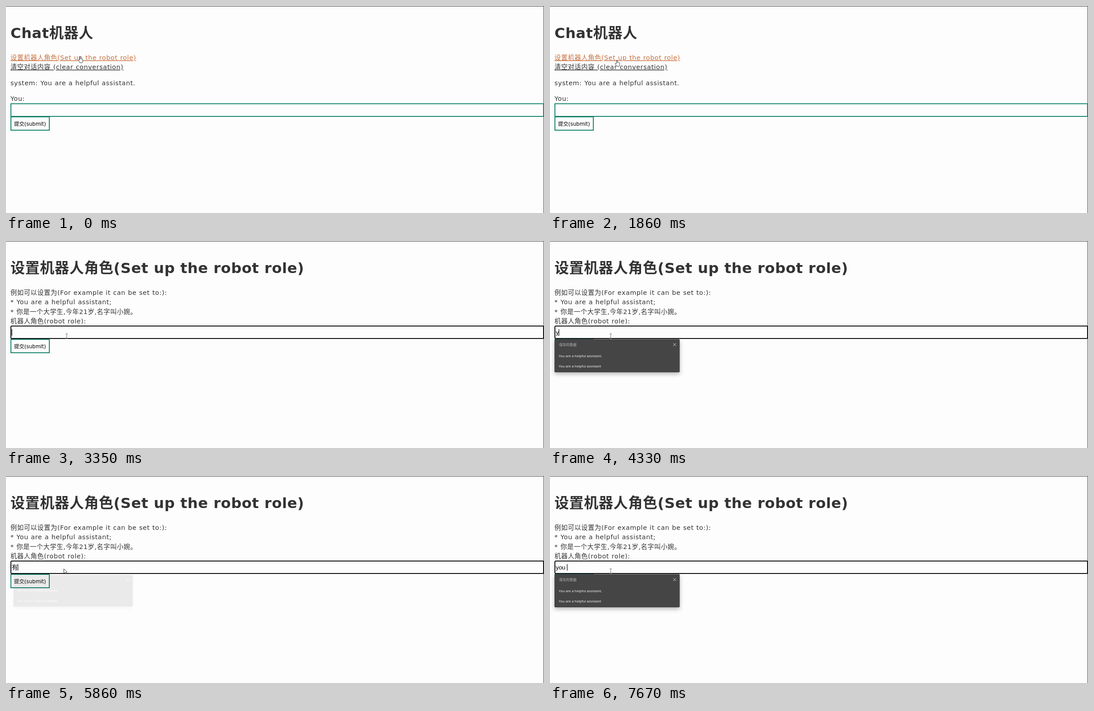
An HTML page that plays this animation: 1205x465 px, repeating every 8 s.

```html
<!DOCTYPE html>
<html lang="zh-CN">
<head>
<meta charset="utf-8">
<title>Chat</title>
<style>
html, body { margin: 0; width: 100%; height: 100%; overflow: hidden; background: #fdfdfd; }
svg { display: block; width: 1205px; height: 465px; }
text { font: 14.4px "DejaVu Sans", "Noto Sans CJK SC", "Noto Sans CJK", sans-serif; fill: #333; letter-spacing: .62px; word-spacing: .5px; }
.title { font-size: 32.4px; font-weight: bold; word-spacing: 0; }
.link { text-decoration: underline 1px; text-underline-offset: 1.5px; }
.hover { fill: #c96f3d; }
.button text { font-size: 11.52px; fill: #000; letter-spacing: 0; word-spacing: 0; }
.box { fill: #fdfdfd; stroke: #14836b; stroke-width: 2; }
.ring { fill: #fdfdfd; stroke: #0b0b10; stroke-width: 2; }
#typed { font: 13.333px "Liberation Sans", "Noto Sans CJK SC", "Noto Sans CJK", sans-serif; fill: #000; letter-spacing: 0; word-spacing: 0; }
#typed.composing { text-decoration: underline 1px; text-decoration-skip-ink: none; }

.popup { filter: drop-shadow(0 4px 5px rgba(0, 0, 0, .28)); }
.popup rect { fill: #454545; }
.popup path { stroke: #dcdcdc; fill: none; }
.popup text { font: 7.8px "Open Sans", "Noto Sans CJK SC", "Noto Sans CJK", sans-serif; fill: #fff; letter-spacing: 0; word-spacing: 0; }
.popup .head { fill: #b4b4b4; }

/* 1% of the loop is 80 ms */
#chat, #role, #idle, #focus, .hand, .beam, .arrow { animation: 8s step-end infinite; }
#chat, .hand { animation-name: leave; }
#role { animation-name: enter; }
#idle { animation-name: blur; }
#focus { animation-name: focus; }
.beam { animation-name: beam; }
.arrow { animation-name: arrow; }
#all { transform-origin: 607px 306px; animation: all 8s linear infinite; }
#some { transform-origin: 150px 258px; animation: some 8s linear infinite; }
#cursor { animation: move 8s linear infinite; }

@keyframes leave { 0% { opacity: 1 } 27.5%, 100% { opacity: 0 } }
@keyframes enter { 0% { opacity: 0 } 27.5%, 100% { opacity: 1 } }
@keyframes blur { 0% { opacity: 1 } 41.25%, 100% { opacity: 0 } }
@keyframes focus { 0% { opacity: 0 } 41.25%, 100% { opacity: 1 } }
@keyframes beam {
  0% { opacity: 0 } 27.5% { opacity: 1 } 70.875% { opacity: 0 } 75%, 100% { opacity: 1 }
}
@keyframes arrow { 0% { opacity: 0 } 70.875% { opacity: 1 } 75%, 100% { opacity: 0 } }
@keyframes all {
  0%, 42.5% { opacity: 0; transform: scale(.95) }
  43.625% { opacity: 1; transform: none; animation-timing-function: step-end }
  54.125%, 100% { opacity: 0; transform: none }
}
@keyframes some {
  0% { opacity: 0; transform: none; animation-timing-function: step-end }
  54.125%, 71.25% { opacity: 1; transform: none }
  73.5%, 87.75% { opacity: 0; transform: scale(.947) }
  89.25%, 100% { opacity: 1; transform: none }
}
@keyframes move {
  0%, 2.875% { transform: translate(166px, 113px) }
  7.5% { transform: translate(157px, 117px) }
  12.25%, 14% { transform: translate(147px, 126px) }
  15.125% { transform: translate(150px, 121px) }
  27.5% { transform: translate(150px, 121px); animation-timing-function: ease-in-out }
  41.25%, 100% { transform: translate(136px, 214px) }
}
</style>
</head>
<body>
<svg viewBox="0 0 1205 465">
  <defs>
    <g id="submit" class="button">
      <rect class="box" x="11" y="1" width="86" height="30"/>
      <text x="18" y="20.5">提交(submit)</text>
    </g>
  </defs>
  <path d="M0 .5H1204.5V465" fill="none" stroke="#3a3a3a"/>

  <g id="chat">
    <text class="title" x="10" y="72">Chat机器人</text>
    <text class="link hover" x="10" y="121">设置机器人角色(Set up the robot role)</text>
    <text class="link" x="10" y="142">清空对话内容 (clear conversation)</text>
    <text x="10" y="178">system: You are a helpful assistant.</text>
    <text x="10" y="213">You:</text>
    <rect class="box" x="11" y="219.5" width="1193" height="28.5"/>
    <use href="#submit" y="248"/>
  </g>

  <g id="role">
    <text class="title" x="10" y="72">设置机器人角色(Set up the robot role)</text>
    <text x="10" y="121">例如可以设置为(For example it can be set to:):</text>
    <text x="10" y="142">* You are a helpful assistant;</text>
    <text x="10" y="164">* 你是一个大学生,今年21岁,名字叫小婉。</text>
    <text x="10" y="185">机器人角色(robot role):</text>
    <use href="#submit" y="220"/>
    <rect id="idle" class="box" x="11" y="191" width="1193" height="28"/>
    <rect id="focus" class="ring" x="11" y="191" width="1193" height="28" rx="2"/>
    <text id="typed" x="13" y="210"></text>
    <rect id="caret" y="198" width="1.2" height="14.5"/>
  </g>

  <g id="all" class="popup">
    <rect x="10" y="220.5" width="1195" height="171" rx="2"/>
    <text class="head" x="20.5" y="235.5">保存的数据</text>
    <path d="M1190.5 229.5l6.5 6.5m0 -6.5l-6.5 6.5"/>
    <text x="19.5" y="260.5">You are a helpful assistant.</text>
    <text x="19.5" y="284">You are a helpful assistant</text>
    <text x="19.5" y="308">你是一个大学生,今年21岁,名字叫小婉。</text>
    <text x="19.5" y="332">你是一个大学生,今年21岁,名字叫小婉,喜欢看书、听音乐和旅行,说话温柔有礼貌,回答问题时会先想一想,再用简单清楚的话说给对方听。</text>
    <text x="19.5" y="356">你是一个大学生</text>
    <text x="19.5" y="380">你是一个机器人</text>
  </g>

  <g id="some" class="popup">
    <rect x="10" y="220.5" width="280.5" height="74.5" rx="2"/>
    <text class="head" x="20.5" y="235.5">保存的数据</text>
    <path d="M276 229.5l6.5 6.5m0 -6.5l-6.5 6.5"/>
    <text x="19.5" y="260.5">You are a helpful assistant.</text>
    <text x="19.5" y="284">You are a helpful assistant</text>
  </g>

  <g id="cursor">
    <path class="hand" fill="#fff" stroke="#222" stroke-width=".9" stroke-linejoin="round"
      d="M-1 8V1Q0 -.6 1 1V5.5Q2.4 4.7 3 6Q4.2 5.4 4.8 6.5Q6 6.2 6 7.8V10.5Q6 12.5 4.8 14.5H-.6Q-1.6 12 -3.6 9.6Q-4.6 8 -3.4 7.6Q-2.3 7.4 -1 9"/>
    <path class="beam" fill="none" stroke="#666" d="M-2.5 -5.5H-.7L0 -5L.7 -5.5H2.5M0 -5V5M-2.5 5.5H-.7L0 5L.7 5.5H2.5"/>
    <path class="arrow" fill="#fff" stroke="#222" stroke-width=".9" stroke-linejoin="round"
      d="M-6.5 -5.5V5L-4 2.8L-2.3 6.5L-.8 5.8L-2.4 2.2H.8Z"/>
  </g>
</svg>
<script>
const LOOP = 8000;
const typed = document.getElementById('typed');
const caret = document.getElementById('caret');

// [time, text, composing]
const keys = [
  [0, ''],
  [4330, 'y', true], [4560, 'yo', true], [4800, 'you', true],
  [5670, '有'], [6370, ''],
  [7020, 'y'], [7220, 'yo'], [7440, 'you'], [7670, 'you\u00a0']
];
const caretOff = [[0, 3300], [3910, 4330], [5300, 5670], [6230, 6370], [6770, 7020]];

const start = performance.now();

function draw() {
  const t = (performance.now() - start) % LOOP;
  const [, text, composing] = keys.findLast(key => key[0] <= t);
  if (typed.textContent !== text) typed.textContent = text;
  typed.classList.toggle('composing', !!composing);
  caret.setAttribute('x', 12.7 + (text ? typed.getComputedTextLength() : 0));
  caret.style.opacity = caretOff.some(([from, to]) => t >= from && t < to) ? 0 : 1;
  requestAnimationFrame(draw);
}
draw();
</script>
</body>
</html>
```
